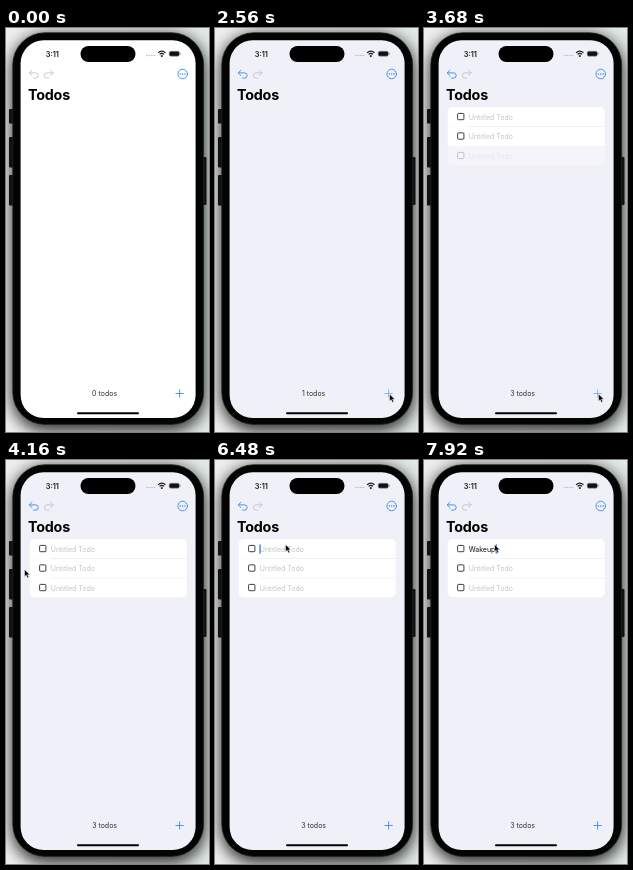
An HTML page that plays this animation: 203 px wide and 404 px high, repeating every 8 s.

```html
<!DOCTYPE html>
<html lang="en">
<head>
<meta charset="utf-8">
<title>Todos</title>
<style>
  html, body { margin: 0; width: 100%; height: 100%; overflow: hidden; background: #e3e5e4; }
  svg { display: block; width: 203px; height: 404px; font: 7px Inter, "Liberation Sans", sans-serif; }
  .icon { fill: none; stroke: #3a8bf2; stroke-width: .9; stroke-linecap: round; stroke-linejoin: round; }
</style>
</head>
<body>
<svg viewBox="0 0 203 404">
  <defs>
    <linearGradient id="wall">
      <stop offset="0" stop-color="#eee"/>
      <stop offset=".7" stop-color="#ebebeb"/>
      <stop offset="1" stop-color="#e0e9e5"/>
    </linearGradient>
    <filter id="blur" x="-20%" y="-20%" width="140%" height="140%">
      <feGaussianBlur stdDeviation="7.5"/>
    </filter>
    <clipPath id="card"><rect id="cardClip" x="23.8" y="79" width="157" height="0" rx="5"/></clipPath>
  </defs>

  <rect width="203" height="404" fill="url(#wall)"/>
  <rect x="5" y="6" width="195" height="398" rx="36" opacity=".76" filter="url(#blur)"/>
  <g fill="#101112">
    <rect x="3" y="81" width="5" height="14.5" rx="1"/>
    <rect x="3" y="109" width="5" height="30.5" rx="1"/>
    <rect x="3" y="147" width="5" height="30.5" rx="1"/>
    <rect x="196" y="129" width="4.5" height="48" rx="1"/>
  </g>
  <rect x="6.8" y="4.8" width="190.8" height="391.6" rx="32" fill="#020303" stroke="#232627" stroke-width=".8"/>
  <rect id="screen" x="14.6" y="12.3" width="175" height="377.8" rx="23"/>
  <rect x="74.5" y="18" width="55" height="16" rx="8"/>

  <text x="39.7" y="28.5" font-size="7.4" font-weight="600" fill="#1a1a1a">3:11</text>
  <g fill="#b9b9bc">
    <circle cx="141" cy="27.5" r=".8"/><circle cx="143.5" cy="27.5" r=".8"/>
    <circle cx="146" cy="27.5" r=".8"/><circle cx="148.5" cy="27.5" r=".8"/>
  </g>
  <g fill="none" stroke="#111" stroke-width="1.2">
    <path d="M152.2 24.7q3.6-3.2 7.2 0M153.6 26.4q2.2-1.9 4.4 0"/>
    <circle cx="155.8" cy="27.9" r=".4"/>
  </g>
  <rect x="163.2" y="23.2" width="10.2" height="5" rx="1.6" fill="#111" stroke="#999" stroke-width=".6"/>
  <path d="M174.6 24.8v1.8" stroke="#999" stroke-width=".8"/>

  <path id="undo" class="icon" d="M26 42.2l-2.8 2.7 2.8 2.7M23.4 44.9h6.2a2.6 2.6 0 0 1 0 5.2h-2"/>
  <path class="icon" style="stroke:#c3c3c6" d="M44.5 42.2l2.8 2.7-2.8 2.7M47.1 44.9h-6.2a2.6 2.6 0 0 0 0 5.2h2"/>
  <circle class="icon" cx="176.7" cy="46" r="4.8"/>
  <g fill="#3a8bf2">
    <circle cx="174.4" cy="46" r=".75"/><circle cx="176.7" cy="46" r=".75"/><circle cx="179" cy="46" r=".75"/>
  </g>
  <text x="22" y="72" font-size="14.3" font-weight="700" letter-spacing="-.2">Todos</text>

  <g id="rows" clip-path="url(#card)"></g>
  <rect id="caret" y="84.2" width="1.3" height="9.6" rx=".6" fill="#2f7ff0"/>

  <text id="count" x="98.6" y="368.3" text-anchor="middle" fill="#2c2c2e"></text>
  <path id="plus" class="icon" d="M169.9 365.5h7.4M173.6 361.8v7.4"/>
  <rect x="71" y="384.3" width="62" height="2" rx="1"/>
  <path id="cursor" d="M0 0v7.2l1.7-1.5 1.2 2.7 1.4-.6-1.2-2.6h2.3z" fill="#050505" stroke="#fff" stroke-width=".5"/>
</svg>
<script>
const LOOP = 8000, ROW = 19.5;
const taps = [2560, 3040, 3600];        // presses on the plus button
const focusAt = 5600;
const keys = [6720, 6900, 7080, 7260, 7440, 7640];
const word = "Wakeup";
// time, x, y of the pointer tip
const path = [
  [1250, 204, 374], [1760, 182.5, 363], [2080, 182.5, 363], [2400, 174.5, 366],
  [3720, 174.5, 366], [4120, 18.5, 109.5], [4400, 18.5, 109.5],
  [5000, 69, 83], [5300, 69, 83], [5560, 70.5, 84.5], [LOOP, 70.5, 84.5]
];

const $ = id => document.getElementById(id);
const clamp = v => Math.max(0, Math.min(1, v));
const ease = v => v * v * (3 - 2 * v);
const passed = (times, t) => times.filter(x => t >= x).length;

$("rows").innerHTML = taps.map((_, i) => {
  const y = 79 + i * ROW;
  return `<g>
    <rect x="23" y="${y}" width="159" height="${ROW}" fill="#fff"/>
    ${i ? `<path d="M45 ${y}h136" stroke="#e6e6ea" stroke-width=".5"/>` : ""}
    <rect x="33.6" y="${y + 6.4}" width="6.3" height="6.3" rx=".8" fill="none" stroke="#2a2a2a" stroke-width=".9"/>
    <text x="44.7" y="${y + 12.8}" fill="#c4c4c7">Untitled Todo</text></g>`;
}).join("");
const rows = [...$("rows").children];
const field = rows[0].querySelector("text");

function pointer(t) {
  const i = path.findIndex(p => p[0] > t);
  if (i < 1) return path[0].slice(1);
  const [t0, x0, y0] = path[i - 1], [t1, x1, y1] = path[i];
  const k = ease((t - t0) / (t1 - t0));
  return [x0 + (x1 - x0) * k, y0 + (y1 - y0) * k];
}

function draw(t) {
  const n = passed(taps, t);
  $("screen").setAttribute("fill", n ? "#f0f0f8" : "#fff");
  $("undo").style.stroke = n ? "#3a8bf2" : "#c3c3c6";
  $("count").textContent = n + " todos";
  $("cardClip").setAttribute("height", ROW * n);
  rows.forEach((row, i) => row.setAttribute("opacity", ease(clamp((t - taps[i]) / 240))));
  $("plus").setAttribute("opacity", taps.some(x => t > x - 90 && t < x + 170) ? .6 : 1);

  const typed = word.slice(0, passed(keys, t));
  field.textContent = typed || "Untitled Todo";
  field.setAttribute("fill", typed ? "#111" : "#c4c4c7");
  const blink = typed || (t - focusAt) % 1000 < 600 || t > 6300;
  $("caret").setAttribute("opacity", t >= focusAt && blink ? 1 : 0);
  $("caret").setAttribute("x", 44.4 + (typed ? field.getComputedTextLength() + .6 : 0));

  $("cursor").setAttribute("transform", `translate(${pointer(t)})`);
  $("cursor").setAttribute("opacity", t < path[0][0] ? 0 : 1);
}

const start = performance.now();
function tick() {
  draw((performance.now() - start) % LOOP);
  requestAnimationFrame(tick);
}
tick();
</script>
</body>
</html>
```
